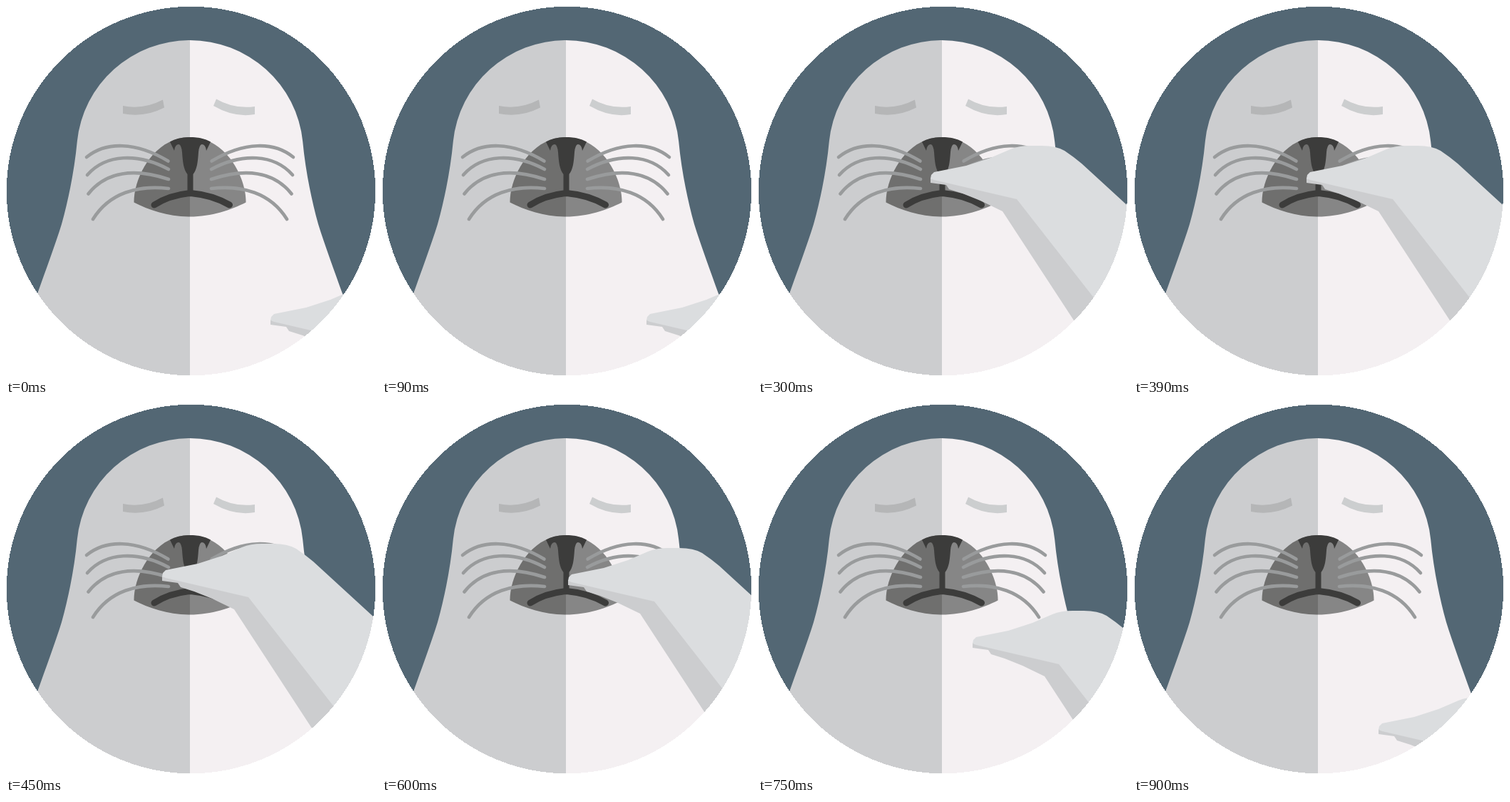
These frames come from a looping animation (519 px wide and 519 px high, 1.05 s). An HTML page:

```html
<!DOCTYPE html>
<html lang="en">
<head>
<meta charset="utf-8">
<title>Seal facepalm</title>
<style>
  html, body { margin: 0; width: 100%; height: 100%; overflow: hidden; background: #fff; }
  svg { display: block; width: 100%; height: 100%; }
  .line { fill: none; stroke-linecap: round; stroke-linejoin: round; }
  .whiskers { stroke: #999b9c; stroke-width: 4.6; }
  .mouth { stroke: #3c3c3b; stroke-width: 9; }

  /* Each pose is held, then the flipper jumps to the next one. */
  #flipper { animation: palm 1050ms step-end infinite; }
  @keyframes palm {
    0%      { transform: translate(371px, 440px); }
    14.286% { transform: translate(330px, 327px); }
    28.571% { transform: translate(242px, 241px); }
    42.857% { transform: translate(219px, 241px); }
    57.143% { transform: translate(261px, 247px); }
    71.429% { transform: translate(301px, 335px); }
    85.714%, 100% { transform: translate(343px, 456px); }
  }
</style>
</head>
<body>
<svg viewBox="0 0 519 519" role="img" aria-label="A seal covering its face with a flipper">
  <defs>
    <path id="body" d="M258 519V48A159 158 0 0 1 416.200 190C420 230 428 270 438 306C447 335 460 370 472.500 405L512 519Z"/>
    <path id="muzzle" d="M258 184C308 184 337 240 336.500 275.500C316 286 288 295.500 258 295.500Z"/>
    <g id="whiskers" class="line whiskers">
      <path d="M113 212C140 190 182 190 227.500 217.500"/>
      <path d="M114 237C140 207.500 185 206 228 229"/>
      <path d="M115.500 263.500C140 232 180 227 228 243"/>
      <path d="M122 299C145 262 185 251 228 256"/>
    </g>
    <path id="nostril" d="M259 184C248 184 238 186 230 190.500L236 203Q237 194 242.500 194Q246 195 247 205C248 219 249 229 254.500 236V261H259Z"/>
  </defs>

  <rect width="519" height="519" fill="#536774"/>
  <use href="#body" fill="#f4f0f2"/>
  <use href="#body" fill="#cccdcf" transform="matrix(-1 0 0 1 516 0)"/>

  <path d="M164 140Q192 146 220 131.500L222 142.500Q194 157 164 151Z" fill="#b5b6b7"/>
  <path d="M295 130.500Q320 145 349 141V152Q320 157 291 140Z" fill="#cccecf"/>

  <use href="#muzzle" fill="#868686"/>
  <use href="#muzzle" fill="#6f6f6e" transform="matrix(-1 0 0 1 516 0)"/>
  <g fill="#3c3c3b">
    <use href="#nostril"/>
    <use href="#nostril" transform="matrix(-1 0 0 1 517 0)"/>
  </g>
  <path class="line mouth" d="M208 279Q230 265 259 262.500Q289 265 313.500 279"/>
  <use href="#whiskers"/>
  <use href="#whiskers" transform="matrix(-1 0 0 1 516 0)"/>

  <g id="flipper">
    <path fill="#cccdcf" d="M0 0V7L22 10L26 16L45 22L70 32L101 47L301 353L400 387L121 26Z"/>
    <path fill="#dbdddf" d="M0 1L1 -4L5 -8L50 -17L84 -28L112 -40Q124 -45 140 -45H156Q176 -45 188 -38Q200 -30 212 -20L296 57L460 207V464L121 30L5 3Z"/>
  </g>

  <!-- White surround that leaves a crisp round window -->
  <path fill="#fff" fill-rule="evenodd" shape-rendering="crispEdges"
    d="M-9 -9H528V528H-9ZM.8 259.500a258.700 258.700 0 1 0 517.400 0a258.700 258.700 0 1 0 -517.400 0Z"/>
</svg>
</body>
</html>
```
